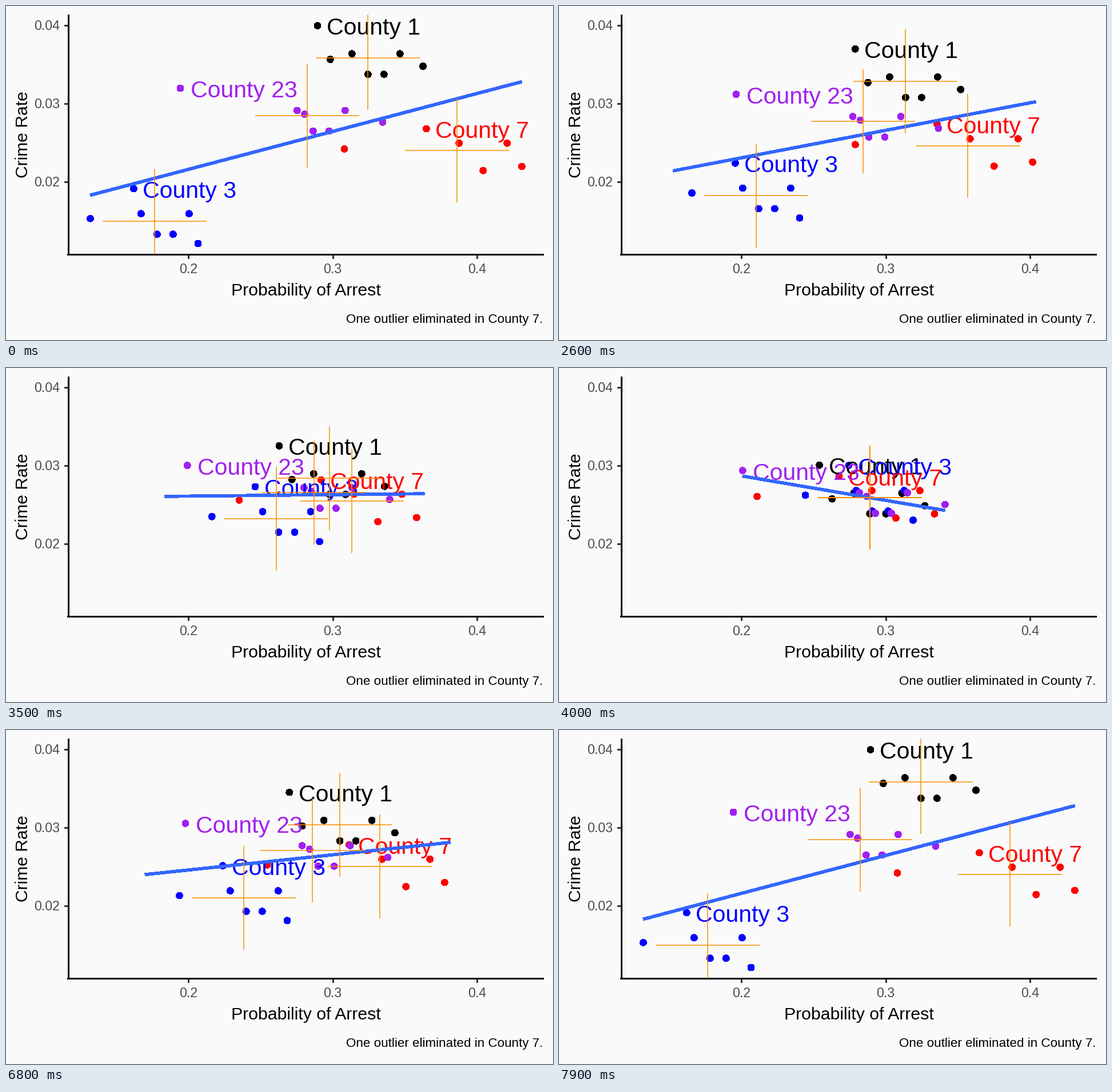
Animation, 957 px wide and 585 px high, one loop 8 s. Source, as a matplotlib script:

```python
import numpy as np
import matplotlib.pyplot as plt
from matplotlib.animation import FuncAnimation

W, H, DPI = 957, 585, 100
PT = 72 / DPI                       # points per pixel
LEFT, RIGHT, TOP, BOTTOM = 108.5, 940, 15, 434.5
ARM = 91                            # half length of a mean cross

# name, colour, dot count, then in pixels: mean, labelled dot, outer dots
COUNTIES = [
    ("County 1", "black", 7, (633, 91.4), (545, 34.5), (567.3, 93.5), (729.5, 105.5)),
    ("County 3", "blue", 7, (260, 376.5), (223.3, 320), (147.5, 372.3), (336, 416)),
    ("County 7", "red", 6, (789, 252.5), (735.3, 215), (592, 250.4), (902.3, 281)),
    ("County 23", "#A020F0", 7, (527.3, 191.5), (305, 144), (522.3, 189.3), (659, 203.5)),
]


def county_dots(count, mean, *outer):
    """Fill in the inner dots along an arch that keeps the county's mean."""
    inner = count - len(outer)
    u = np.linspace(-1, 1, inner)
    arch = np.column_stack([42 * u, 24 * np.cos(np.pi * u)])
    middle = (count * np.array(mean) - np.sum(outer, axis=0)) / inner
    return np.vstack([outer, middle + arch - arch.mean(axis=0)])


def regression(pts):
    x, y = pts.T
    ends = np.array([x.min(), x.max()])
    return np.array([ends, np.polyval(np.polyfit(x, y, 1), ends)])


names, hues, sizes = zip(*(c[:3] for c in COUNTIES))
start = np.vstack([county_dots(*c[2:]) for c in COUNTIES])
means = np.array([c[3] for c in COUNTIES])
tags = np.array([c[4] for c in COUNTIES])
shifts = start.mean(axis=0) - means      # moves every county to the grand mean
dot_shifts = np.repeat(shifts, sizes, axis=0)
fit_start, fit_end = regression(start), regression(start + dot_shifts)

plt.rcParams["font.family"] = "Liberation Sans"
fig = plt.figure(figsize=(W / DPI, H / DPI), dpi=DPI, facecolor="#FAFAFA")
ax = fig.add_axes([0, 0, 1, 1])
ax.set_xlim(0, W)
ax.set_ylim(H, 0)
ax.axis("off")


def line(xs, ys, color, width, z, smooth=False):
    return ax.plot(xs, ys, color=color, lw=width * PT, zorder=z,
                   antialiased=smooth, solid_capstyle="butt")[0]


def text(x, y, s, size, color="black", **kw):
    return ax.text(x, y, s, size=size * PT, color=color, va="baseline", **kw)


# Axes, ticks and titles
for i in range(3):
    x, y = 319 + 252.6 * i, 33.5 + 137 * i
    line([x, x], [BOTTOM, BOTTOM + 7], "#333333", 3, 1)
    line([LEFT - 7, LEFT], [y, y], "#333333", 3, 1)
    text(x, 468, f"{0.2 + 0.1 * i:.1f}", 23.3, "#4D4D4D", ha="center")
    text(94, y + 8.5, f"{0.04 - 0.01 * i:.2f}", 23.3, "#4D4D4D", ha="right")
line([LEFT, LEFT], [TOP, BOTTOM + 1.5], "black", 3, 2)
line([LEFT - 1.5, RIGHT], [BOTTOM, BOTTOM], "black", 3, 2)
text(524.5, 507, "Probability of Arrest", 30.2, ha="center")
text(38.5, 225.5, "Crime Rate", 30, ha="center", rotation=90,
     rotation_mode="anchor")
text(939, 555, "One outlier eliminated in County 7.", 22.4, ha="right")

# Moving parts
dots = ax.scatter(*start.T, s=(11.8 * PT) ** 2, c=np.repeat(hues, sizes),
                  linewidths=0, antialiased=False, zorder=3)
labels = [text(0, 0, name, 41, hue, zorder=4) for name, hue in zip(names, hues)]
fit = line(*fit_start, "#3366FF", 4.8, 5)
crosses = [[line([], [], "#FF8C00", 1.5, 6, smooth=True) for _ in range(2)]
           for _ in COUNTIES]


def draw(frame):
    p = np.clip((frame - 20) / 20, 0, 1) - np.clip((frame - 59) / 20, 0, 1)
    dots.set_offsets(start + p * dot_shifts)
    fit.set_data(*((1 - p) * fit_start + p * fit_end))
    for name, label, tag, (x, y) in zip(names, labels, tags, p * shifts):
        label.set_position((tag[0] + x + 2 * len(name), tag[1] + y + 16))
    for (across, down), (x, y) in zip(crosses, means + p * shifts):
        across.set_data([x - ARM, x + ARM], [y, y])
        down.set_data([x, x], np.clip([y - ARM, y + ARM], TOP, BOTTOM))
    return [dots, fit, *labels, *sum(crosses, [])]


anim = FuncAnimation(fig, draw, frames=80, interval=100, repeat=True,
                     repeat_delay=0, blit=False)
plt.show()
```
